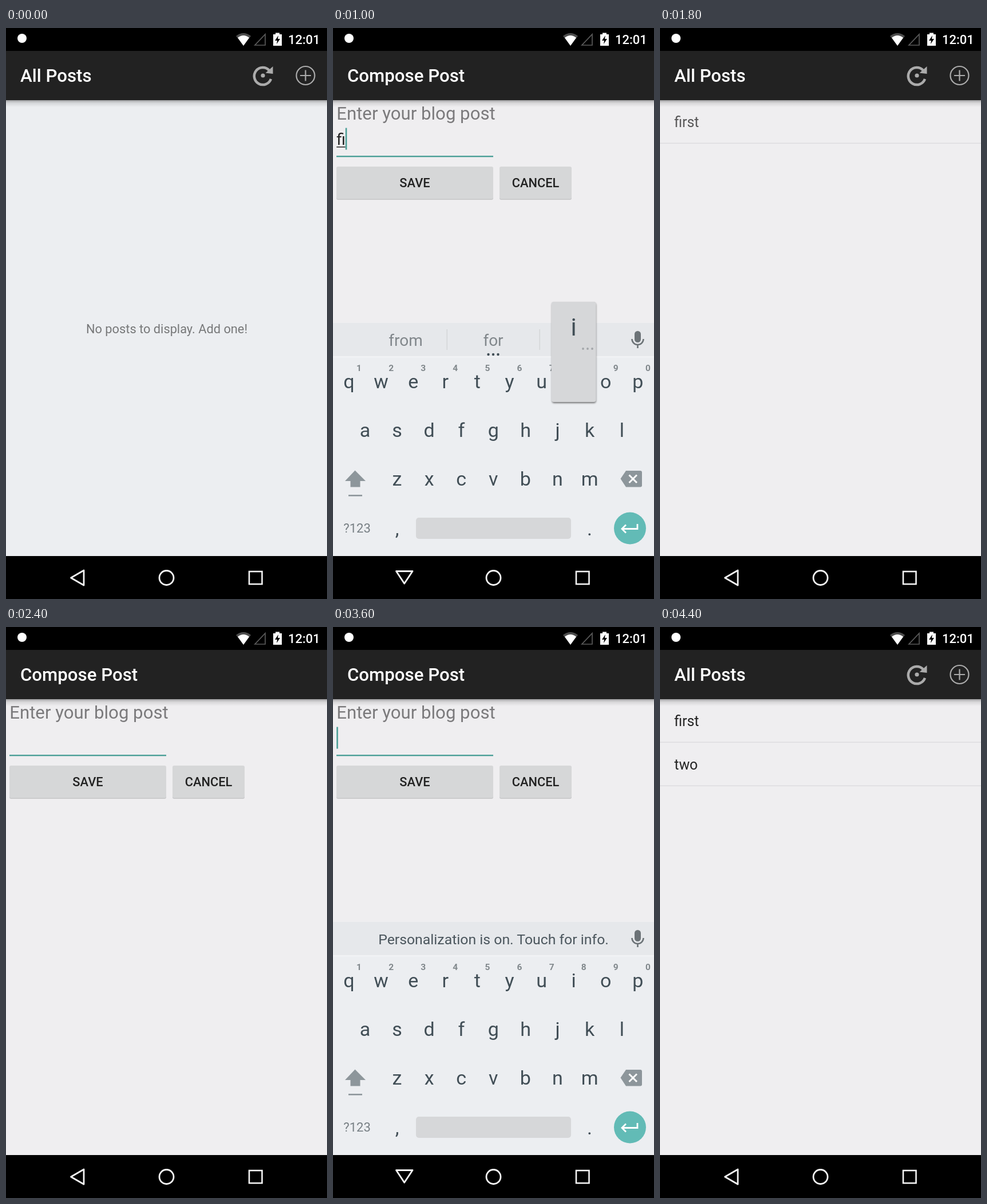
An HTML page for the animation above (4800 ms loop, 561x997 px).

```html
<!DOCTYPE html>
<html lang="en">
<head>
<meta charset="utf-8">
<title>Posting app</title>
<style>
  html, body { margin: 0; width: 100%; height: 100%; overflow: hidden; background: #000; }
  svg { display: block; width: 100vw; height: 100vh; font-family: Roboto, sans-serif; }
</style>
</head>
<body>
<svg id="stage" viewBox="0 0 561 997"></svg>
<script>
const LOOP = 4800;
const stage = document.getElementById('stage');
const PAPER = '#efeef0', INK = '#414e56', TEAL = '#4b9f97';

const rect = (x, y, w, h, fill, extra = '') =>
  `<rect x="${x}" y="${y}" width="${w}" height="${h}" fill="${fill}" ${extra}/>`;
const path = (d, fill, extra = '') => `<path d="${d}" fill="${fill}" ${extra}/>`;
const line = (d, color, width, extra = '') =>
  path(d, 'none', `stroke="${color}" stroke-width="${width}" ${extra}`);
const circle = (x, y, r, fill, extra = '') =>
  `<circle cx="${x}" cy="${y}" r="${r}" fill="${fill}" ${extra}/>`;
const text = (str, x, y, size, fill, extra = '') =>
  `<text x="${x}" y="${y}" font-size="${size}" fill="${fill}" ${extra}>${str}</text>`;
const centered = (str, x, y, size, fill, extra = '') =>
  text(str, x, y, size, fill, `text-anchor="middle" ${extra}`);
const MEDIUM = 'font-weight="500"';

const defs = `<defs>
  <linearGradient id="fall" x1="0" y1="0" x2="0" y2="1">
    <stop offset="0" stop-color="#000" stop-opacity=".32"/>
    <stop offset=".4" stop-color="#000" stop-opacity=".1"/>
    <stop offset="1" stop-color="#000" stop-opacity="0"/>
  </linearGradient>
  <filter id="soft" x="-20%" y="-20%" width="140%" height="140%">
    <feGaussianBlur stdDeviation="6"/>
  </filter>
  <filter id="near" x="-20%" y="-20%" width="140%" height="140%">
    <feGaussianBlur stdDeviation="1.5"/>
  </filter>
</defs>`;

function statusBar() {
  return rect(0, 0, 561, 40, '#000') +
    circle(28, 18, 8, '#fff') +
    path('M415 31L402 14Q415 4 428 14Z', '#4d4d4d') +
    path('M415 31L405 17Q415 9 425 17Z', '#fff') +
    line('M435 30H453V11Z', '#5a5a5a', 1.7) +
    path('M467 11H471V8.500H478V11H482V31H467Z', '#fff') +
    path('M476 13L470 22H474L473 28L479 19H475Z', '#000') +
    text('12:01', 493, 28, 22, '#fff', MEDIUM);
}

function navBar(keyboardOpen) {
  const back = keyboardOpen ? 'M110.500 948.500H139L124.700 970Z' : 'M113.500 960L136 947V973Z';
  return rect(0, 922, 561, 75, '#000') +
    line(back, '#f4f4f4', 2.8, 'stroke-linejoin="round"') +
    circle(280.5, 960, 12.5, 'none', 'stroke="#f4f4f4" stroke-width="2.8"') +
    rect(425, 949, 22.5, 22, 'none', 'stroke="#f4f4f4" stroke-width="2.6"');
}

function page(title, background) {
  return rect(0, 40, 561, 882, background) +
    rect(0, 126, 561, 12, 'url(#fall)') +
    rect(0, 40, 561, 86, '#222') +
    text(title, 25, 94, 31.2, '#fff', MEDIUM);
}

function listPage({ posts = [], fade = 1 }) {
  const icon = '#ababab';
  let out = page('All Posts', posts.length ? PAPER : '#eceef1') +
    line('M460 74A15 15 0 1 0 463 89', icon, 4.5) +
    path('M466.500 67V80L453.500 78.500Z', icon) +
    circle(449, 83, 3.6, icon) +
    circle(523.5, 83, 16, 'none', `stroke="${icon}" stroke-width="2.2"`) +
    line('M514 83H533M523.500 73.500V92.500', icon, 2.2);
  if (!posts.length) out += centered('No posts to display. Add one!', 281, 533, 21.8, '#777879');
  posts.forEach((post, i) => {
    out += text(post, 25, 173 + 76 * i, 24.9, '#232323', `opacity="${fade}"`) +
      rect(0, 200.5 + 76 * i, 561, 1.6, '#dedde0');
  });
  return out;
}

function button(label, x, width, fill) {
  return rect(x, 243, width, 57, '#c6c6c8', 'rx="3"') +
    rect(x, 242, width, 56.5, fill, 'rx="3"') +
    centered(label, x + width / 2, 278.3, 21.8, '#212121', MEDIUM);
}

function composePage({ typed = '', pressed }) {
  return page('Compose Post', PAPER) +
    text('Enter your blog post', 6.2, 160, 31.2, '#7b7a7c') +
    `<g id="entry">${text(typed, 6.2, 204, 28, '#222')}</g>` +
    rect(6, 223, 274, 2.4, TEAL) +
    button('SAVE', 6, 274, pressed ? '#cecccf' : '#d6d7d8') +
    button('CANCEL', 291, 126, '#d6d7d8');
}

const ROWS = [
  { keys: 'qwertyuiop', x: 28, y: 629 },
  { keys: 'asdfghjkl', x: 56, y: 714 },
  { keys: 'zxcvbnm', x: 112, y: 799 },
];
const PITCH = 56.1;

function popup(key) {
  const row = ROWS.find(r => r.keys.includes(key));
  const x = row.x + PITCH * row.keys.indexOf(key);
  const y = row.y - 151;
  const dots = [437, 445, 453].map(d => circle(x + d - 420.7, y + 82, 1.9, '#a3a6a9')).join('');
  return rect(x - 38, y + 2, 77, 175, '#000', 'rx="4" opacity=".5" filter="url(#near)"') +
    rect(x - 39, y, 78, 175, '#d6d7d9', 'rx="4"') +
    centered(key, x, y + 59, 42, INK) + dots;
}

function keyboard({ words, key }) {
  const grey = '#8d969b', mic = '#6c7377';
  let out = rect(0, 515, 561, 407, '#eceef1') + rect(0, 515, 561, 58, '#e6e8eb') +
    rect(0, 573, 561, 2.5, '#f2f3f5');
  if (words) {
    out += words.map((w, i) => centered(w, [127, 280, 433][i], 555, 28, '#81878b')).join('') +
      rect(198.5, 526, 1.5, 36, '#d3d6d8') + rect(360.5, 526, 1.5, 36, '#d3d6d8') +
      [271.5, 280, 288.5].map(x => circle(x, 570, 2.2, INK)).join('');
  } else {
    out += centered('Personalization is on. Touch for info.', 280.5, 554, 24.8, '#4b565d');
  }
  out += rect(527, 529, 11, 20, mic, 'rx="5.5"') +
    line('M522.500 543A10 10 0 0 0 542.500 543M532.500 553V559', mic, 2.6);

  for (const { keys, x, y } of ROWS)
    [...keys].forEach((k, i) => out += centered(k, x + PITCH * i, y, 34, INK));
  [...'1234567890'].forEach((n, i) =>
    out += centered(n, 45.5 + PITCH * i, 598.5, 15.5, '#81888c', 'font-weight="700"'));

  out += path('M38.500 772.500L57 791H47.500V801.500H30.500V791H21Z', grey) +
    rect(27, 815, 24, 2.6, grey) +
    path('M502.500 787L512 773H537Q540 773 540 776V798.500Q540 801.500 537 801.500H512Z', grey) +
    line('M517.500 780.500L531 794M531 780.500L517.500 794', '#fff', 3) +
    centered('?123', 42, 881, 22, '#777f84') +
    centered(',', 112, 886, 34, INK) + centered('.', 448.5, 886, 34, INK) +
    rect(145, 855, 271, 37, '#d6d7d9', 'rx="5"') +
    circle(519, 873.5, 28, '#62bbb6') +
    line('M532 866V874.500H506M512 867.500L505 874.500L512 881.500', '#fff', 2.8);
  return out + (key ? popup(key) : '');
}

function loadingDialog() {
  return rect(0, 40, 561, 882, '#000', 'opacity=".1"') +
    rect(34, 414, 493, 142, '#000', 'rx="10" opacity=".16" filter="url(#soft)"') +
    rect(39, 414.5, 483, 131.5, '#eeeef0', 'rx="3" opacity=".66"') +
    rect(115, 447.5, 8, 7, '#6db2ad', 'transform="rotate(10 119 451)"') +
    text('Loading...', 188.5, 489, 21.8, '#9f9fa1');
}

const both = ['first', 'two'];
const SCENES = [
  { at: 0, list: {} },
  { at: 400, list: {}, compose: { alpha: .6, shift: 30 } },
  { at: 600, compose: {} },
  { at: 800, compose: {}, keys: {} },
  { at: 1000, compose: { typed: 'fi', caret: true }, keys: { words: ['from', 'for', 'fit'], key: 'i' } },
  { at: 1200, compose: { typed: 'firs', caret: true }, keys: { words: ['fire', 'first', 'for'], key: 's' } },
  { at: 1400, compose: { typed: 'first', caret: true }, keys: { words: ['firsthand', 'firstly', 'firsts'] } },
  { at: 1600, compose: { typed: 'first', pressed: true }, keys: { words: ['firsthand', 'firstly', 'firsts'] }, loading: true },
  { at: 1800, list: { posts: ['first'], fade: .75 } },
  { at: 2000, list: { posts: ['first'] } },
  { at: 2400, compose: {} },
  { at: 2600, compose: {}, keys: {} },
  { at: 2800, compose: { typed: 'tw', caret: true }, keys: { words: ['the', 'to', 'that'] } },
  { at: 3000, compose: { typed: 'two', caret: true }, keys: { words: ['tel', 'to', 'Tao'] } },
  { at: 3200, list: { posts: both } },
  { at: 3400, list: { posts: both }, compose: { alpha: .9, shift: 0 } },
  { at: 3600, compose: { caret: true }, keys: {} },
  { at: 3800, compose: { typed: 'th', caret: true }, keys: { words: ['the', 'to', 'that'], key: 'h' } },
  { at: 4000, compose: { typed: 'three', caret: true }, keys: { words: ['there', 'three', 'threw'] } },
  { at: 4200, list: { posts: both }, compose: { alpha: .5, shift: 17 } },
  { at: 4400, list: { posts: both } },
];

// Underline and caret follow the real width of the typed text.
function decorateEntry({ typed, caret }) {
  const entry = document.getElementById('entry');
  const width = typed ? entry.firstChild.getComputedTextLength() : 0;
  entry.insertAdjacentHTML('beforeend',
    (typed ? rect(6.2, 207, width, 1.5, '#222') : '') +
    (caret ? rect(6.2 + width, 174.5, 2.6, 38, TEAL) : ''));
}

function draw({ list, compose, keys, loading }) {
  let out = defs + navBar(!!keys);
  if (list) out += listPage(list);
  if (compose) {
    const { alpha = 1, shift = 0 } = compose;
    out += `<g opacity="${alpha}" transform="translate(0 ${shift})">${composePage(compose)}</g>`;
  }
  if (keys) out += keyboard(keys);
  if (loading) out += loadingDialog();
  stage.innerHTML = out + statusBar();
  if (compose) decorateEntry(compose);
}

let shown;
function tick(now) {
  const time = now % LOOP;
  const scene = SCENES.findLast(s => s.at <= time);
  if (scene !== shown) draw(shown = scene);
  requestAnimationFrame(tick);
}
tick(0);
</script>
</body>
</html>
```
